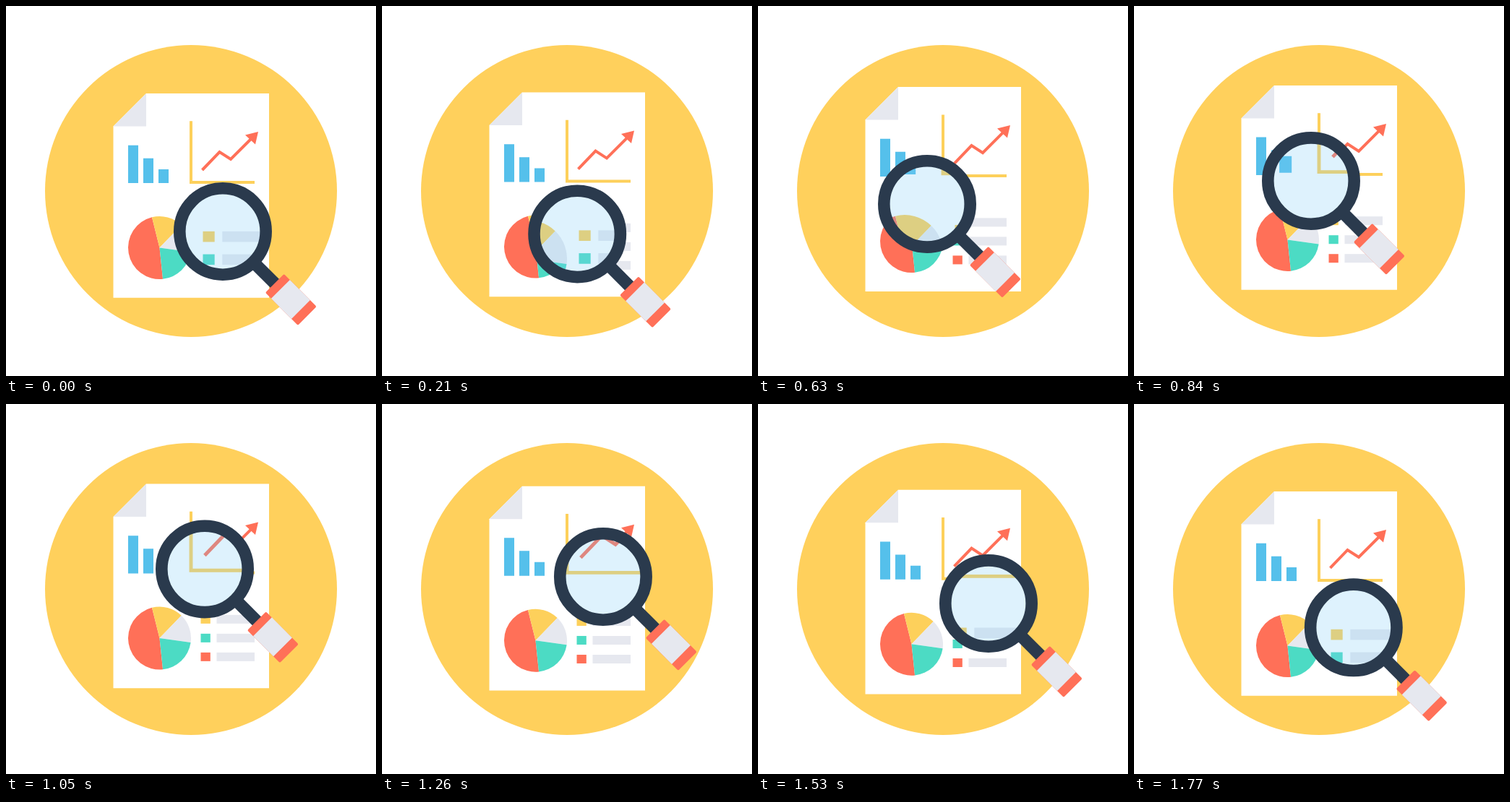
These frames come from a looping animation (512 px wide and 512 px high, 1.8 s). An HTML page:

```html
<!DOCTYPE html>
<html lang="en">
<head>
<meta charset="utf-8">
<title>Report search</title>
<style>
  html, body { margin: 0; width: 100%; height: 100%; overflow: hidden; background: #fff; }
  svg { display: block; width: 100vw; height: 100vh; }
</style>
</head>
<body>
<svg viewBox="0 0 512 512">
  <defs>
    <clipPath id="glass"><circle id="hole" r="53"/></clipPath>
    <g id="charts">
      <path fill="#55c0eb" d="M169 192.7h14V245h-14zM190 210.7h14V245h-14zM211 226h14v19h-14z"/>
      <path fill="none" stroke="#fdd05b" stroke-width="4" d="M256 159.3V244H344"/>
      <path fill="none" stroke="#ff7058" stroke-width="4" d="M271.5 227 295.5 202 311 212 341 182"/>
      <path fill="#ff7058" d="M349 174 345 191.5 331 178.5z"/>
      <g id="pie" transform="translate(212.5 334.5)"></g>
      <g id="legend"></g>
    </g>
  </defs>

  <circle cx="256" cy="256" r="202" fill="#ffd05c"/>
  <g id="page">
    <path fill="#fff" d="M194 121H364V403.8H148.5V166.5z"/>
    <path fill="#e6e8ef" d="M194 121V166.5H148.5z"/>
    <use href="#charts"/>
  </g>
  <g clip-path="url(#glass)">
    <rect width="512" height="512" fill="#fff"/>
    <use id="zoomed" href="#charts"/>
    <rect width="512" height="512" fill="#7bcbf7" fill-opacity=".25"/>
  </g>
  <g id="lens">
    <circle r="59.7" fill="none" stroke="#2a3a4d" stroke-width="16.6"/>
    <g transform="rotate(45)">
      <path fill="#2a3a4d" d="M65-8.5h38v17H65z"/>
      <rect x="101.5" y="-18.3" width="63.8" height="36.6" rx="2" fill="#ff7058"/>
      <path fill="#e6e8ef" d="M113-18.3h39.7v36.6H113z"/>
    </g>
  </g>
</svg>
<script>
  const LOOP = 1800, STEP = 30, ZOOM = 1.22;
  const RAD = Math.PI / 180;
  const $ = id => document.getElementById(id);
  const RED = '#ff7058', YELLOW = '#fdd05b', TEAL = '#4cdbc4', GREY = '#e6e8ef';

  // Slices: start angle, end angle (degrees clockwise from the right), colour
  const slices = [[84, 256, RED], [256, 314, YELLOW], [314, 368, GREY], [8, 84, TEAL]];
  const rim = a => `${43.5 * Math.cos(a * RAD)} ${43.5 * Math.sin(a * RAD)}`;
  $('pie').innerHTML = slices.map(([a, b, fill]) =>
    `<path fill="${fill}" d="M0 0L${rim(a)}A43.5 43.5 0 0 1 ${rim(b)}z"/>`).join('');

  $('legend').innerHTML = [YELLOW, TEAL, RED].map((fill, i) => {
    const y = 302.3 + 26 * i;
    return `<rect x="269.5" y="${y}" width="13.3" height="12" fill="${fill}"/>
      <rect x="291.5" y="${y}" width="52.5" height="12" fill="${GREY}"/>`;
  }).join('');

  // Lens orbit: time, radius, lead angle over a steady turn
  const orbit = [[0, 43.8, 57.6], [390, 38.8, 55.9], [630, 42.5, 55.4],
                 [840, 45.6, 58.3], [1260, 46.5, 57.3], [1530, 42.5, 55.4]];

  function key(i) {
    const n = orbit.length, [t, r, a] = orbit[(i + n) % n];
    return [t + LOOP * Math.floor(i / n), r, a];
  }

  // Smooth periodic curve through one column of the orbit keys
  function curve(t, col) {
    const i = orbit.findLastIndex(k => k[0] <= t);
    const [p, a, b, q] = [i - 1, i, i + 1, i + 2].map(key);
    const slope = (u, v) => (v[col] - u[col]) / (v[0] - u[0]);
    const d = b[0] - a[0], s = (t - a[0]) / d, w = 1 - s;
    return a[col] * w * w * (1 + 2 * s) + b[col] * s * s * (3 - 2 * s)
      + d * s * w * (w * slope(p, b) - s * slope(a, q));
  }

  function draw(now) {
    const t = Math.floor(now % LOOP / STEP) * STEP;
    const turn = 360 * t / LOOP;
    const lift = 5.6 * (Math.cos(turn * RAD) - 1);
    const r = curve(t, 1), angle = (turn + curve(t, 2)) * RAD;
    const spot = `translate(${276.5 + r * Math.cos(angle)} ${275 + r * Math.sin(angle)})`;
    $('page').setAttribute('transform', `translate(0 ${lift})`);
    $('zoomed').setAttribute('transform',
      `translate(256 ${259 + lift}) scale(${ZOOM}) translate(-256 -259)`);
    $('hole').setAttribute('transform', spot);
    $('lens').setAttribute('transform', spot);
  }

  const start = performance.now();
  function tick() {
    draw(performance.now() - start);
    requestAnimationFrame(tick);
  }
  tick();
</script>
</body>
</html>
```
